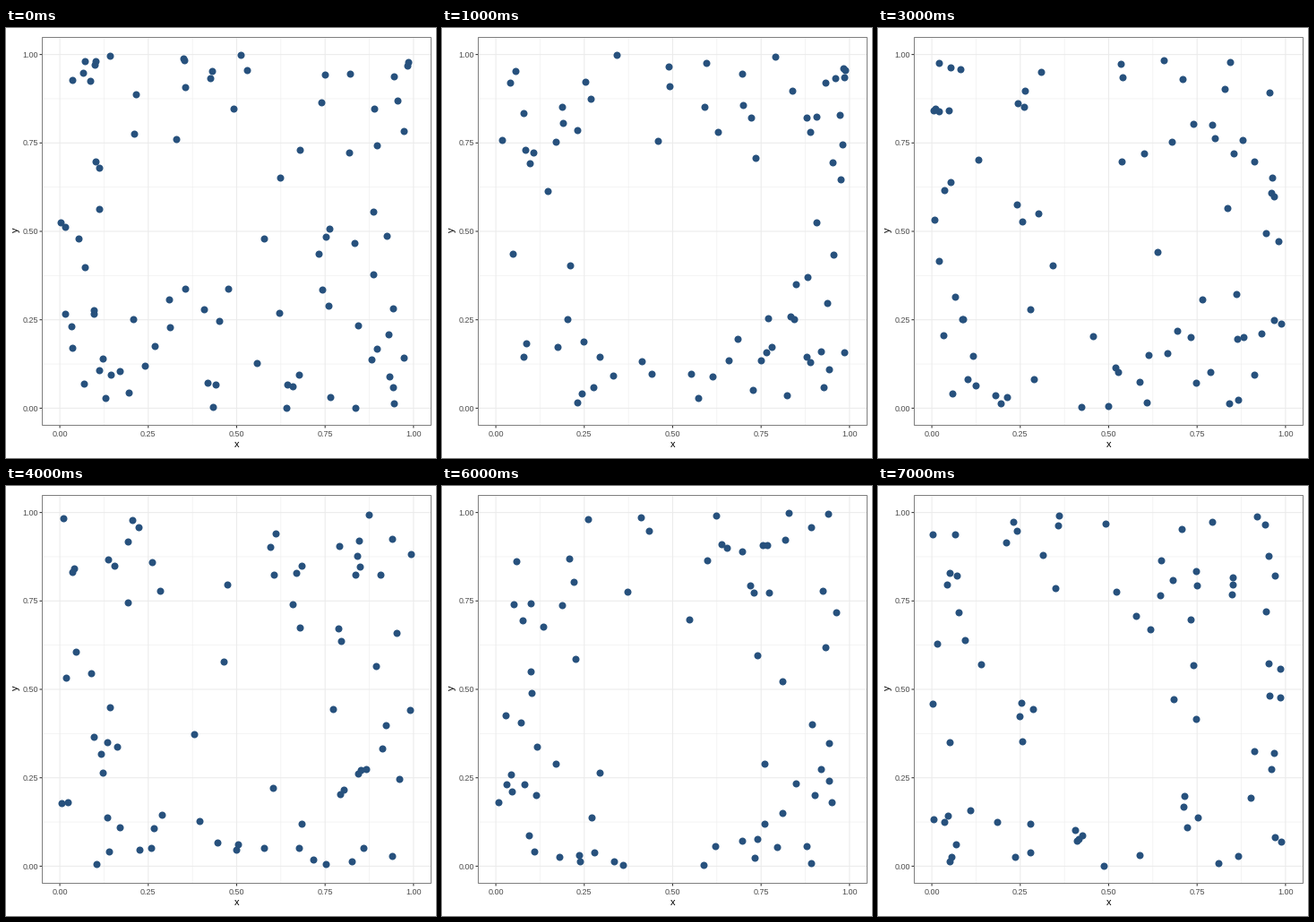
A matplotlib script for the animation above (8 s loop, 480 by 480 pixels).

```python
import matplotlib.pyplot as plt
import numpy as np
from matplotlib.animation import FuncAnimation

SIZE = 480
SPAN = 394.8
LEFT, BASE = 60.1, 424.4
X0, X1, Y0, Y1 = 40.5, 474.5, 443.5, 10.5  # panel edges
BLUE, INK, LABEL, GRID = "#27517d", "#333333", "#4d4d4d", "#ebebeb"
CANDIDATES = 245


def px(x):
    return LEFT + SPAN * x


def py(y):
    return BASE - SPAN * y


def cloud(step):
    """Poisson points, thinned so they grow denser away from the centre."""
    rng = np.random.default_rng(40 + step)
    points = rng.random((rng.poisson(CANDIDATES), 2))
    r2 = ((points - 0.5) ** 2).sum(axis=1)
    return points[rng.random(len(points)) < 2 * r2]


plt.rcParams["font.family"] = "Liberation Sans"
fig = plt.figure(figsize=(SIZE / 72, SIZE / 72), dpi=72, facecolor="white")
ax = fig.add_axes([0, 0, 1, 1])
ax.set(xlim=(0, SIZE), ylim=(SIZE, 0))
ax.axis("off")


def line(xs, ys, color, width):
    ax.plot(xs, ys, color=color, lw=width, solid_capstyle="butt",
            snap=False, zorder=1)


def grid(v, width):
    line([px(v)] * 2, [Y0, Y1], GRID, width)
    line([X0, X1], [py(v)] * 2, GRID, width)


for v in np.arange(0.125, 1, 0.25):
    grid(v, 0.53)

for v in np.linspace(0, 1, 5):
    grid(v, 1.07)
    line([px(v)] * 2, [Y0, Y0 + 3], INK, 1.07)
    line([X0 - 3, X0], [py(v)] * 2, INK, 1.07)
    ax.text(px(v), 456, f"{v:.2f}", size=9, color=LABEL,
            ha="center", va="baseline")
    ax.text(35.8, py(v) + 3.2, f"{v:.2f}", size=9, color=LABEL,
            ha="right", va="baseline")

ax.text(257.3, 468, "x", size=11, ha="center", va="baseline")
ax.text(10.5, 225.5, "y", size=11, rotation=90, ha="center", va="center")
ax.add_patch(plt.Rectangle((X0, Y1), X1 - X0, Y0 - Y1, fill=False,
                           ec="#7f7f7f", lw=1, snap=False, zorder=2))

dots, = ax.plot([], [], "o", ms=8, color=BLUE, mew=0, zorder=3)


def draw(step):
    x, y = cloud(step).T
    dots.set_data(px(x), py(y))
    return dots,


anim = FuncAnimation(fig, draw, frames=8, interval=1000, repeat=True,
                     repeat_delay=0, init_func=lambda: (dots,))
plt.show()
```
